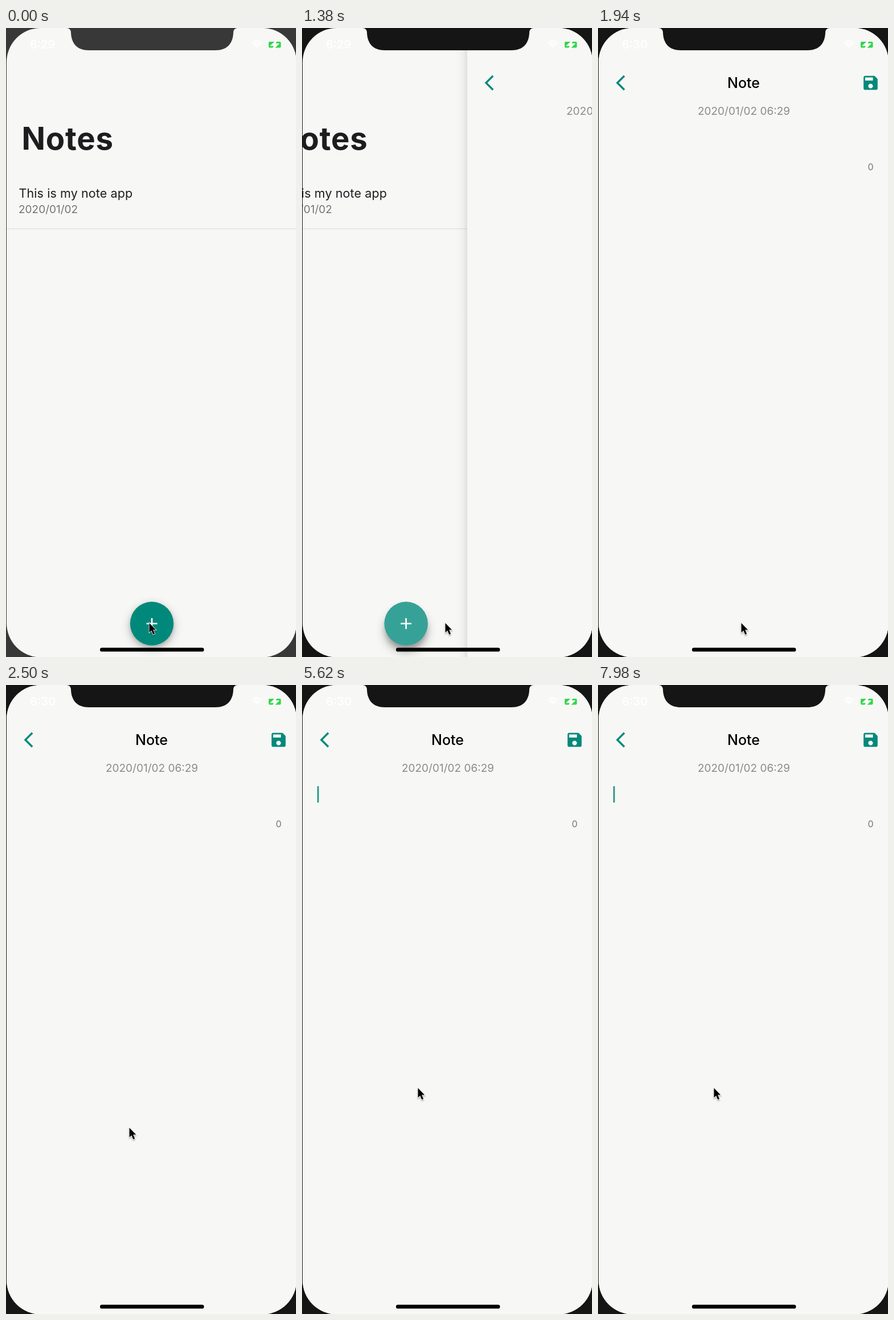
An HTML page that plays this animation: 509 by 1101 pixels, repeating every 8000 ms.

```html
<!DOCTYPE html>
<html lang="en">
<head>
<meta charset="utf-8">
<title>Notes</title>
<style>
  html, body { margin: 0; width: 100%; height: 100%; overflow: hidden; }
  svg { display: block; width: 100%; height: 100%; }
  text { font-family: Inter, Roboto, sans-serif; white-space: pre; }
  .paper { fill: #f7f7f5; }
  .teal { fill: #00897b; }
  .ink { fill: #1d1d1f; }
  .date { font-size: 19px; }
  .heading { font-size: 54.5px; font-weight: 700; letter-spacing: .8px; }
  .item { font-size: 21.5px; letter-spacing: .1px; }
  .title { font-size: 25px; font-weight: 500; }
  .counter { font-size: 16px; }
  .clock { font-size: 20px; font-weight: 600; fill: #fff; }
</style>
</head>
<body>
<svg viewBox="0 0 509 1101" preserveAspectRatio="none">
  <defs>
    <clipPath id="screen"><rect x="1" width="509" height="1101.5" rx="60"/></clipPath>
    <linearGradient id="edge" x1="1" x2="0">
      <stop offset="0" stop-opacity=".22"/>
      <stop offset=".3" stop-opacity=".07"/>
      <stop offset=".6" stop-opacity=".016"/>
      <stop offset="1" stop-opacity="0"/>
    </linearGradient>
    <filter id="soft" x="-50%" y="-50%" width="200%" height="200%">
      <feGaussianBlur stdDeviation="4.5"/>
    </filter>
    <filter id="softer" x="-70%" y="-70%" width="240%" height="240%">
      <feGaussianBlur stdDeviation="9"/>
    </filter>
    <filter id="arrowShadow" x="-50%" y="-50%" width="220%" height="220%">
      <feDropShadow dx="0" dy="1.5" stdDeviation="1.3" flood-opacity=".4"/>
    </filter>
  </defs>

  <rect id="bezel" width="509" height="1101"/>

  <g clip-path="url(#screen)">
    <rect class="paper" width="510" height="1102"/>

    <g id="list">
      <text class="heading ink" x="27.5" y="213">Notes</text>
      <text class="item ink" x="22.5" y="297">This is my note app</text>
      <text class="date" x="22" y="324" fill="#747474">2020/01/02</text>
      <rect x="1" y="351" width="600" height="1" fill="#dadadf"/>
      <circle id="ambient" cx="256" r="38" opacity=".24" filter="url(#softer)"/>
      <circle id="contact" cx="256" r="36.5" opacity=".2" filter="url(#soft)"/>
      <circle class="teal" cx="256" cy="1042.5" r="38.2"/>
      <circle id="fabGlow" cx="256" cy="1042.5" r="38.2" fill="#fff"/>
      <path d="M246.5 1042.5h19M256 1033v19" stroke="#fff" stroke-width="2.7"/>
    </g>

    <g id="note">
      <rect id="noteEdge" x="-24.4" width="25.4" height="1102" fill="url(#edge)"/>
      <rect class="paper" x="1" width="510" height="1102"/>
      <path class="teal" transform="translate(31.6 79.7) scale(1.357)"
        d="M11.67 3.87 9.9 2.1 0 12l9.9 9.9 1.77-1.77L3.54 12z"/>
      <text class="title" x="255.5" y="105" text-anchor="middle">Note</text>
      <path class="teal" transform="translate(462 79.6) scale(1.37)"
        d="M17 3H5c-1.11 0-2 .9-2 2v14c0 1.1.89 2 2 2h14c1.1 0 2-.9 2-2V7l-4-4zm-5 16c-1.66 0-3-1.34-3-3s1.34-3 3-3 3 1.34 3 3-1.34 3-3 3zm3-10H5V5h10v4z"/>
      <text class="date" x="256" y="152" text-anchor="middle" fill="#8b8b8b">2020/01/02 06:29</text>
      <rect id="caret" class="teal" x="26.8" y="177" width="2.7" height="29" rx="1.2"/>
      <text class="counter" x="483.5" y="248.5" text-anchor="end" fill="#757575">0</text>
    </g>

    <text id="clock" class="clock" x="42" y="36"></text>
    <path d="M431.5 27q9-8 18 0M434.5 30.5q6-5 12 0M438 33.5q2.5-2 5 0"
      fill="none" stroke="#fff" stroke-width="2.2"/>
    <rect x="461" y="24" width="21.5" height="10.5" rx="2" fill="#35d64d"/>
    <path d="M474.5 22 465.5 30.5H471L468.5 37 478 28H472.5Z"
      fill="#fff" stroke="#fff" stroke-width="1.8"/>
    <rect x="165" y="1084.8" width="182.5" height="6.7" rx="3.35"/>
  </g>

  <path id="notch" d="M106 0Q113.5 0 114 8C114.5 27 125 39 145 39H368C388 39 398.500 27 399 8Q399.5 0 407 0Z"/>

  <path id="arrow" d="M0 0V16.8L3.8 13.200 6.8 20.200 9.700 19 6.700 12H11.700Z"
    stroke="#fff" stroke-width="1.5" paint-order="stroke" filter="url(#arrowShadow)"/>
</svg>

<script>
const LOOP = 8000;
const PUSH_START = 27, PUSH_LENGTH = 12;
const CARET_START = 101, BLINK_START = 120.5, BLINK_HALF = 15, BLINK_FADE = 7.5;

const el = id => document.getElementById(id);
const set = (id, name, value) => el(id).setAttribute(name, value);
const clamp = v => Math.min(1, Math.max(0, v));
const span = (v, a, b) => clamp((v - a) / (b - a));
const mix = (a, b, k) => a + (b - a) * k;
const smooth = k => k * k * (3 - 2 * k);

function bezier(x1, y1, x2, y2) {
  const at = (a, b, s) => 3 * (1 - s) ** 2 * s * a + 3 * (1 - s) * s * s * b + s ** 3;
  return x => {
    if (x <= 0 || x >= 1) return clamp(x);
    let lo = 0, hi = 1;
    for (let i = 0; i < 30; i++) {
      const mid = (lo + hi) / 2;
      if (at(x1, x2, mid) < x) lo = mid; else hi = mid;
    }
    return at(y1, y2, lo);
  };
}
const pushEase = bezier(0.35, 0.91, 0.33, 0.97);
const easeOut = bezier(0, 0, 0.58, 1);

// Steps come in threes, held for 20, 20 and 100 ms.
function stepAt(ms) {
  const t = ms + 20;
  return 3 * Math.floor(t / 140) + Math.min(2, Math.floor(t % 140 / 20)) - 1;
}

function caretOpacity(n) {
  if (n < CARET_START) return 0;
  if (n < BLINK_START) return 1;
  const since = n - BLINK_START;
  const fade = easeOut(clamp(since % BLINK_HALF / BLINK_FADE));
  return Math.floor(since / BLINK_HALF) % 2 ? fade : 1 - fade;
}

function draw(ms) {
  const n = stepAt(ms);

  const shade = Math.round(mix(56, 21, span(n, 0, 8)));
  const frame = `rgb(${shade},${shade},${shade})`;
  set("bezel", "fill", frame);
  set("notch", "fill", frame);
  el("clock").textContent = n < 32 ? "6:29" : "6:30";

  const push = pushEase(span(n, PUSH_START, PUSH_START + PUSH_LENGTH));
  set("list", "transform", `translate(${-509 / 3 * push} 0)`);
  set("note", "transform", `translate(${509 * (1 - push)} 0)`);
  set("note", "visibility", push > 0 ? "visible" : "hidden");
  set("noteEdge", "opacity", push);

  const press = span(n, 23, 28);
  set("fabGlow", "opacity", 0.21 * press);
  set("contact", "cy", mix(1046.5, 1052, press));
  set("ambient", "cy", mix(1048, 1055, press));

  set("caret", "opacity", caretOpacity(n));

  const go = smooth(span(n, 41, 59.5) ** 0.8);
  const x = mix(251.5, 203.5, go) + 18.8 * go * (1 - go);
  set("arrow", "transform", `translate(${x} ${mix(1041.5, 705.5, go)})`);
}

function tick() {
  draw(performance.now() % LOOP);
  requestAnimationFrame(tick);
}
tick();
</script>
</body>
</html>
```
